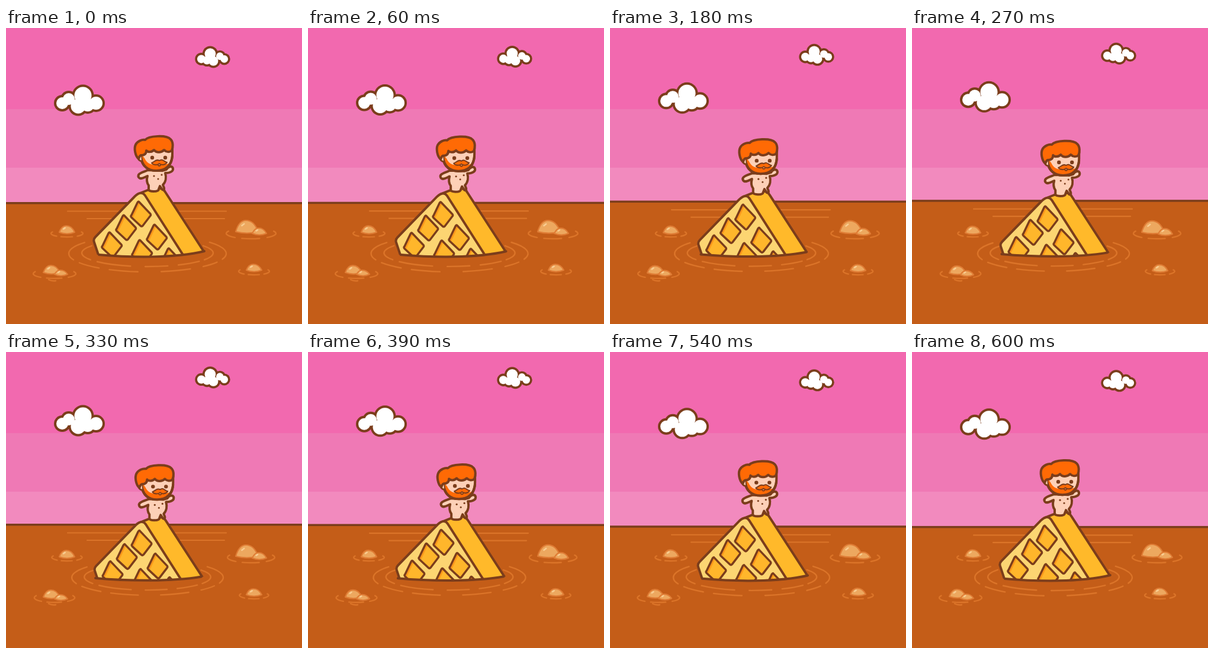
An HTML page with a canvas that plays this animation: 500 by 500 pixels, repeating every 0.63 s.

```html
<!DOCTYPE html>
<html lang="en">
<head>
<meta charset="utf-8">
<title>Waffle island</title>
<style>
html, body { margin: 0; width: 100%; height: 100%; overflow: hidden; }
canvas { display: block; width: 500px; height: 500px; }
</style>
</head>
<body>
<canvas width="500" height="500"></canvas>
<script>
const LOOP = 630, STEP = 30;
const BROWN = '#7b3d1b', WATER = '#c45d18', RIPPLE = '#db7429', SKIN = '#fdd0b7', HAIR = '#ff6a05';
const ctx = document.querySelector('canvas').getContext('2d');
ctx.lineCap = ctx.lineJoin = 'round';

const lerp = (a, b, p) => a + (b - a) * p;

function rect(color, y, h) {
  ctx.fillStyle = color;
  ctx.fillRect(0, y, 500, h);
}

function shape(d, fill, stroke = BROWN, width = 4) {
  const path = new Path2D(d);
  if (fill) { ctx.fillStyle = fill; ctx.fill(path); }
  if (stroke) { ctx.strokeStyle = stroke; ctx.lineWidth = width; ctx.stroke(path); }
}

function dot(x, y, r, color) {
  ctx.fillStyle = color;
  ctx.beginPath();
  ctx.arc(x, y, r, 0, 7);
  ctx.fill();
}

function at(x, y, draw, sx = 1, sy = 1) {
  ctx.save();
  ctx.translate(x, y);
  ctx.scale(sx, sy);
  draw();
  ctx.restore();
}

// Dashed ellipse; each span is a pair of angles in degrees.
function ring(x, y, rx, ry, spans) {
  ctx.strokeStyle = RIPPLE;
  ctx.lineWidth = 2.4;
  for (const [a, b] of spans) {
    ctx.beginPath();
    ctx.ellipse(x, y, rx, ry, 0, a * Math.PI / 180, b * Math.PI / 180);
    ctx.stroke();
  }
}

const puffs = [[-29, 5, 12], [-18, -2, 12], [6, -8, 16.5], [28, 5, 13], [-2, 10, 14.5], [14, 8, 13]];
function cloud(line) {
  for (const [x, y, r] of puffs) dot(x, y, r + line, BROWN);
  for (const [x, y, r] of puffs) dot(x, y, r - line, '#fff');
}

function rock(x, base, w, h) {
  shape(`M${x - w} ${base - 2}C${x - w * .8} ${base - h * .7} ${x - w * .5} ${base - h} ${x - w * .1} ${base - h}
    C${x + w * .5} ${base - h} ${x + w * .8} ${base - h * .6} ${x + w} ${base - 2}
    Q${x} ${base + 3} ${x - w} ${base - 2}Z`, '#eda85f', '#df7c35', 2.2);
  shape(`M${x - w * .45} ${base - h * .58}l${w * .2} ${-h * .14}`, null, '#f9cd92', 2.5);
}

const rockSpans = [[-25, 50], [70, 112], [130, 205]];
function rocks(p) {
  const s = 1 - .05 * p;
  for (const [x, y, rx, ry] of [[103, 347, 27, 6], [414, 347, 42, 9], [82, 415, 36, 8], [419, 411, 26, 6]])
    ring(x, y, rx * s, ry, rockSpans);
  shape('M72 425Q77 428 84 427', null, RIPPLE, 2.4);
  at(0, p, () => {
    rock(103, 347, 13, 13);
    rock(407, 346, 19, 21);
    rock(428, 349, 12, 11);
    rock(77, 415, 14, 14);
    rock(93, 418, 11, 9);
    rock(419, 411, 13, 12);
  });
}

function cell(x, y) {
  const d = 'M-3 -20L16 0Q17 2 16 3L3 20Q1 22-1 20L-16 6Q-18 4-16 2L-6-19Q-4-22-3-20Z';
  at(x, y, () => {
    ctx.save();
    ctx.clip(new Path2D(d));
    shape(d, '#ff991b', null);
    at(4, 2, () => shape(d, '#ffb62b', null));
    ctx.restore();
    shape(d, null, BROWN, 3.5);
  });
}

function waffle(p, dx, dy) {
  const lx = lerp(157, 151, p), ly = lerp(383, 382, p);
  const rx = lerp(335, 330, p), ry = lerp(377, 379.5, p);
  const waterline = `${lx} ${ly}C${lx + 55} ${ly + 5} ${rx - 50} ${ly + 6} ${rx} ${ry}`;
  ctx.save();
  ctx.clip(new Path2D(`M100 200V${ly}L${waterline}L400 ${ry}V200Z`));
  at(dx, dy, () => {
    shape('M224 280L239 274 258 271Q265 270 269 277L350 402 310 402Z', '#ffb92a');
    shape('M161 398L149 362Q147 357 151 353L218 284Q229 274 235 283L311 402Z', '#fcd572');
    for (const [x, y] of [[228, 314], [203, 337], [179, 366], [255, 353], [230, 379], [279, 393]]) cell(x, y);
  });
  ctx.restore();
  shape('M' + waterline, null);
}

function bather() {
  shape(`M240 240C230 244 221 246 224 252C227 257 234 252 239 250C237 257 238 262 241 266V273
    Q242 276 249 276Q258 276 258 272L260 267 264 273Q268 274 267 270L265 265C270 260 271 252 269 245
    C277 245 283 242 282 237C280 232 274 234 271 239L264 241Z`, SKIN);
  dot(250, 250, 1.6, BROWN);
  dot(263, 248, 1.6, BROWN);
  dot(257, 255, 1.5, BROWN);
  shape('M228 202C224 232 238 241 254 241C272 241 281 231 281 213V200Z', SKIN);
  shape(`M228 212L234 220C238 229 245 231 253 231L267 231 279 228C275 238 266 241 254 241
    C239 241 228 232 228 212Z`, HAIR, null);
  shape('M228 216C229 233 240 241 254 241C270 241 279 233 281 216', null);
  shape('M228 214C221 213 221 224 229 225', SKIN, BROWN, 3);
  shape(`M224 221C218 216 216 203 219 197C222 191 230 188 235 189C241 182 271 180 278 188
    C283 193 282 202 280 207C276 210 271 210 267 206C262 211 254 211 250 206
    C246 210 240 210 237 207C237 213 233 215 228 215C225 216 225 219 224 221Z`, HAIR);
  dot(247, 219, 3.2, BROWN);
  dot(269, 219, 3.2, BROWN);
  shape('M259 224C254 221 251 226 246 228C249 232 256 232 259 229C262 232 269 232 272 227C267 226 264 220 259 224Z',
    HAIR, BROWN, 2);
  shape('M257 232Q259 234 261 232', null, BROWN, 1.8);
}

function draw(time) {
  const t = Math.floor(time % LOOP / STEP) * STEP;
  const p = (1 - Math.cos(t / LOOP * 2 * Math.PI)) / 2;
  const dx = 1.3 * p, dy = 8.4 * p, lift = -4 * p;

  rect('#f269af', 0, 137);
  rect('#ef79b5', 137, 99);
  rect('#f28abe', 236, 64);
  at(124, 122 - 6 * p, () => cloud(2));
  at(349, 49 - 6 * p, () => cloud(2.7), -.68, .68);

  rect(WATER, 296 + lift, 210);
  rect(BROWN, 294 + lift, 3.5);
  shape(`M104 ${309.5 + lift}H372M137 ${322 + lift}H369`, null, RIPPLE, 2.2);

  const s = 1 - .038 * p;
  ring(239, 381, 133 * s, 31 * s, [[-38, 18], [28, 45], [57, 80], [97, 119], [128, 150], [160, 217]]);
  ring(239, 380, 111 * s, 23 * s, [[-32, 30], [38, 62], [72, 92], [105, 140], [150, 212]]);
  rocks(p);
  waffle(p, dx, dy);
  at(dx, dy, bather);
}

function tick() {
  draw(performance.now());
  requestAnimationFrame(tick);
}
tick();
</script>
</body>
</html>
```
